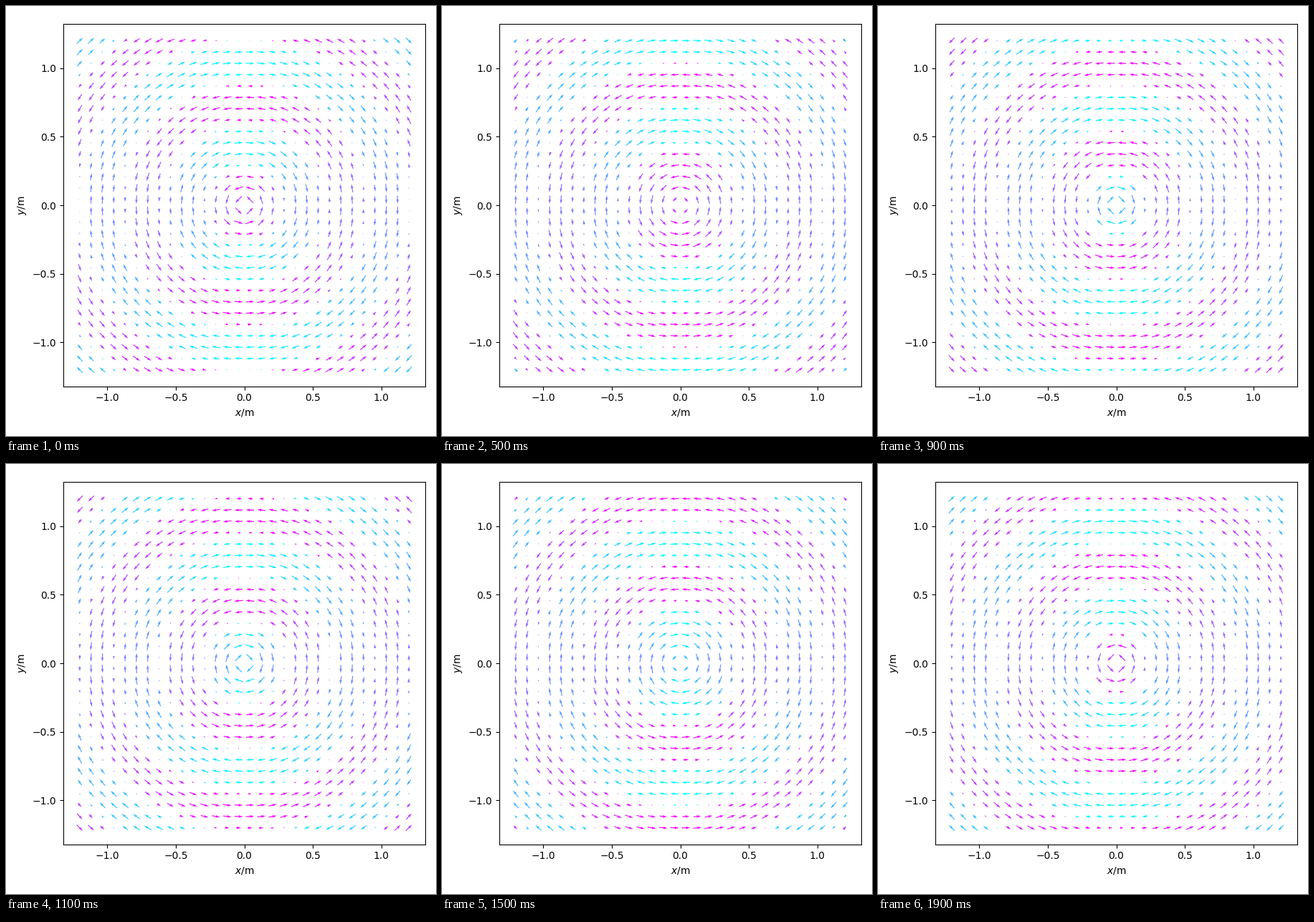
Write a matplotlib script that moves like this. It is 600 by 600 pixels and loops after 2000 ms.

```python
import numpy as np
import matplotlib.pyplot as plt
from matplotlib.animation import FuncAnimation

SIZE = 600
DPI = 100
FRAMES = 20
INTERVAL = 100
K = 10.35          # wave number in 1/m
ARROW = 13.0       # longest arrow in pixels

fig = plt.figure(figsize=(SIZE / DPI, SIZE / DPI), dpi=DPI, facecolor="white")
ax = fig.add_axes([79.9 / SIZE, 69.4 / SIZE, 505.2 / SIZE, 505.2 / SIZE])
ax.set_xlim(-1.32, 1.32)
ax.set_ylim(-1.32, 1.32)
ticks = np.arange(-1, 1.01, 0.5)
ax.set_xticks(ticks)
ax.set_yticks(ticks)
ax.set_xlabel(r"$x$/m")
ax.set_ylabel(r"$y$/m")

axis = np.linspace(-1.2, 1.2, 30)
X, Y = np.meshgrid(axis, axis)
R = np.hypot(X, Y)
KR = K * R
PHASE = KR - np.arctan(KR)
NEAR = (1 + 1 / KR**2) ** 1.5
TILT = np.arctan2(np.abs(Y), np.abs(X)) / (np.pi / 2)


def field(frame):
    """Azimuthal dipole wave: arrow components and signed colour value."""
    wave = NEAR * np.cos(PHASE - 2 * np.pi * frame / FRAMES)
    length = ARROW * np.tanh(1.6 * wave)
    return -length * Y / R, length * X / R, np.sign(wave) * TILT


arrows = ax.quiver(X, Y, *field(0), pivot="mid", cmap="cool",
                   scale_units="dots", scale=1)
arrows.set_clim(-1, 1)


def draw(frame):
    arrows.set_UVC(*field(frame))
    return (arrows,)


anim = FuncAnimation(fig, draw, frames=FRAMES, interval=INTERVAL,
                     init_func=lambda: draw(0), repeat=True, repeat_delay=0)
plt.show()
```
